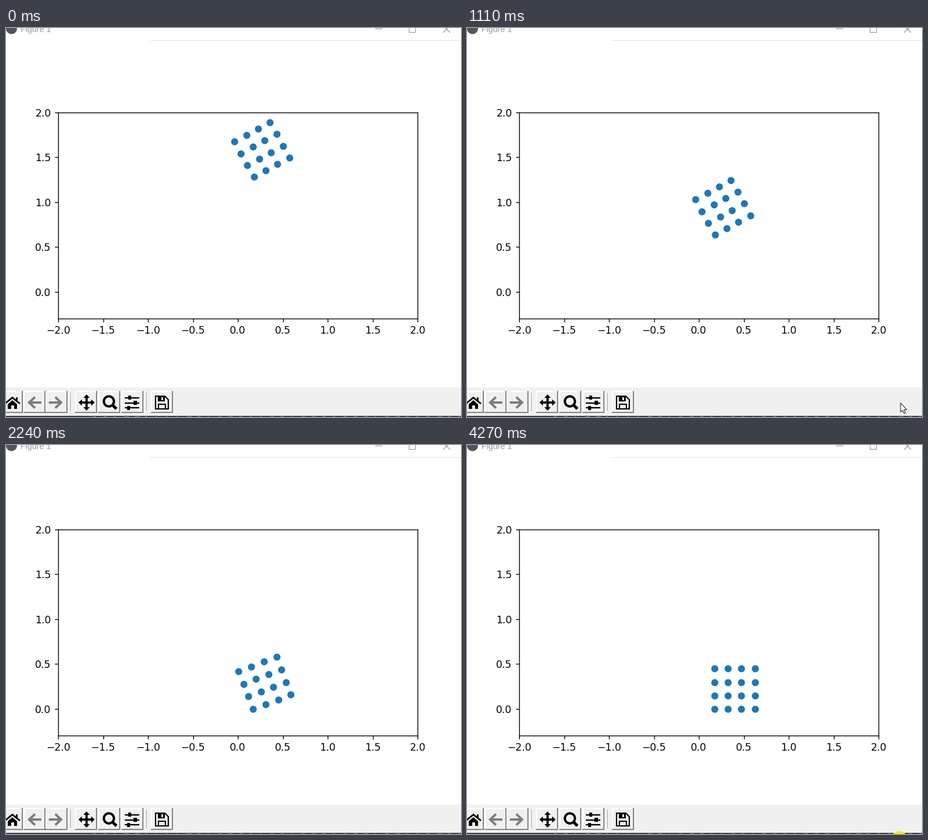
Animation, 785 px wide and 672 px high, one loop 4.36 s. Source, as a matplotlib script:

```python
import random

import matplotlib.pyplot as plt
import numpy as np
from matplotlib.animation import FuncAnimation
from matplotlib.patches import Circle, Polygon, Rectangle

W, H, DPI = 785, 672, 125
PX = 72 / DPI  # points per pixel
TICK = 20
FRAMES = 218
STEP_MS = 47.4
FACE = "#f0f0f0"

fig = plt.figure(figsize=(W / DPI, H / DPI), dpi=DPI, facecolor="white")


def pixel_axes():
    layer = fig.add_axes([0, 0, 1, 1])
    layer.set_xlim(0, W)
    layer.set_ylim(H, 0)
    layer.axis("off")
    return layer


ui = pixel_axes()


def rect(x0, y0, x1, y1, color="black"):
    ui.add_patch(Rectangle((x0, y0), x1 - x0, y1 - y0, fc=color, lw=0))


def poly(points, color="black"):
    ui.add_patch(Polygon(points, fc=color, lw=0))


def line(points, width, color="black"):
    xs, ys = zip(*points)
    ui.plot(xs, ys, color=color, lw=width * PX,
            solid_capstyle="butt", solid_joinstyle="miter")


def button(x0, x1, y0=627, y1=665):
    rect(x0, y0, x1, y1, "#696969")
    rect(x0, y0, x1 - 1, y1 - 1, "#a0a0a0")
    rect(x0, y0, x1 - 2, y1 - 2, "white")
    rect(x0 + 2, y0 + 2, x1 - 2, y1 - 2, FACE)


def separator(x):
    rect(x - 1, 630, x, 662, "#a0a0a0")
    rect(x, 630, x + 1, 662, "white")


def title_bar():
    ui.add_patch(Circle((9.5, 1), 9.5, fc="#555555", lw=0))
    ui.text(25, 7, "Figure 1", color="#999999", family="Liberation Sans",
            fontsize=14.2 * PX, va="baseline")
    rect(249, 21, W, 22, "#e3e3e3")
    gray = "#8a8a8a"
    rect(637, 1, 649, 2, gray)
    rect(695, 0, 707, 8, gray)
    rect(696, 0, 706, 7, "white")
    line([(754, 8), (766, -4)], 1.1, gray)
    line([(754, -4), (766, 8)], 1.1, gray)


def home_icon(cx=11):
    line([(cx - 13, 649), (cx, 638.5), (cx + 13, 649)], 2.8)
    rect(cx + 6, 637.5, cx + 9, 645)
    poly([(cx - 8, 650), (cx, 643), (cx + 8, 650), (cx + 8, 658),
          (cx - 8, 658)])
    rect(cx - 2.5, 651.5, cx + 2.5, 658, FACE)


def arrow_icon(cx, way, cy=647):
    gray = "#7c7c7c"
    tip = cx + 9 * way
    line([(cx - way, cy - 9.5), (tip, cy), (cx - way, cy + 9.5)], 4, gray)
    line([(cx - 12 * way, cy), (tip, cy)], 4, gray)


def move_icon(cx=139, cy=647):
    for dx, dy in ((1, 0), (-1, 0), (0, 1), (0, -1)):
        line([(cx, cy), (cx + 9 * dx, cy + 9 * dy)], 3.8)
        bx, by = cx + 8 * dx, cy + 8 * dy
        poly([(cx + 14 * dx, cy + 14 * dy),
              (bx + 5.5 * dy, by + 5.5 * dx), (bx - 5.5 * dy, by - 5.5 * dx)])


def zoom_icon(cx=177.5, cy=645):
    ui.add_patch(Circle((cx, cy), 8.7, fill=False, ec="black", lw=4 * PX))
    line([(cx + 6, cy + 6), (cx + 13, cy + 13)], 5)


def sliders_icon(cx=217.5, cy=647.5):
    for row, shift in ((-1, -4), (0, 5.5), (1, -6)):
        y, knob = cy + 8.7 * row, cx + shift
        line([(cx - 12.5, y), (cx + 12.5, y)], 2.3)
        rect(knob - 4, y - 3.5, knob + 4, y + 3.5, FACE)
        rect(knob - 2.6, y - 3.5, knob + 2.6, y + 3.5)


def save_icon(x=258, y=636):
    ui.add_patch(Polygon([(x, y), (x + 16, y), (x + 22, y + 6),
                          (x + 22, y + 22), (x, y + 22)],
                         fill=False, ec="black", lw=2.1 * PX))
    rect(x + 4, y, x + 15.5, y + 8.5)
    rect(x + 10, y + 1.5, x + 13, y + 6.5, FACE)
    line([(x + 5, y + 22), (x + 5, y + 14), (x + 17, y + 14),
          (x + 17, y + 22)], 2)


def toolbar():
    rect(0, 621, W, 670, FACE)
    for x0 in (-9, 30, 68, 119, 159, 199, 250):
        button(x0, x0 + 38)
    separator(112)
    separator(243)
    home_icon()
    arrow_icon(49, -1)
    arrow_icon(86, 1)
    move_icon()
    zoom_icon()
    sliders_icon()
    save_icon()
    # sliver of the window below
    rect(0, 670, W, H, "#3c3c3c")
    rng = random.Random(4)
    for x in range(150, W, 18):
        rect(x, 671, x + rng.randint(2, 9), H, "#8a8a8a")


title_bar()
toolbar()

ax = fig.add_axes([90 / W, (H - 502.25) / H, 620 / W, 356.5 / H])
ax.set_xlim(-2, 2)
ax.set_ylim(-0.3, 2)
ax.set_xticks(np.arange(-2, 2.1, 0.5))
ax.set_yticks(np.arange(0, 2.1, 0.5))
ax.tick_params(labelsize=10)
dots, = ax.plot([], [], "o", color="#1f77b4", ms=6)

top = pixel_axes()
ARROW = np.array([(0.5, 0.5), (0.5, 16.5), (4, 13), (6.6, 18.6), (9, 17.6),
                  (6.5, 12), (11, 12)])
cursor = top.add_patch(Polygon(ARROW, fc="white", ec="#0c0c20", lw=PX))
click = top.add_patch(Circle((745.5, 681.6), 14.6, fc="#f2ea1c", lw=0))

U, V = 0.15 * np.array([(i, j) for j in range(4) for i in range(4)]).T


def pose(step):
    """Lowest corner and tilt: fall, one small hop, then settle flat."""
    fall = 1.28 - 0.02503 * step - 0.000131 * step ** 2
    hop = np.clip((step - 47) / 14, 0, 1)
    settle = np.clip((step - 43) / 27, 0, 1)
    x = 0.178 - 0.005 * settle - 0.021 * np.sin(np.pi * settle)
    y = max(fall, -0.002) + 0.066 * np.sin(np.pi * hop)
    return x, y, 0.5 * (1 - settle) ** 2.05


def pointer(step):
    u = step - 18
    return 760 - 2.5 * u, 583 + 17.3 * u - 0.89 * u ** 2


def update(i):
    t = i * TICK + TICK / 2
    step = int(t / STEP_MS + 0.5)
    x, y, tilt = pose(step)
    c, s = np.cos(tilt), np.sin(tilt)
    dots.set_data(x + c * U - s * V, y + s * U + c * V)
    cursor.set_xy(ARROW + pointer(step))
    cursor.set_visible(10 < step < 26)
    click.set_visible(t >= 4270)
    return dots, cursor, click


anim = FuncAnimation(fig, update, frames=FRAMES, interval=TICK,
                     init_func=lambda: update(0), repeat=True, repeat_delay=0)
plt.show()
```
